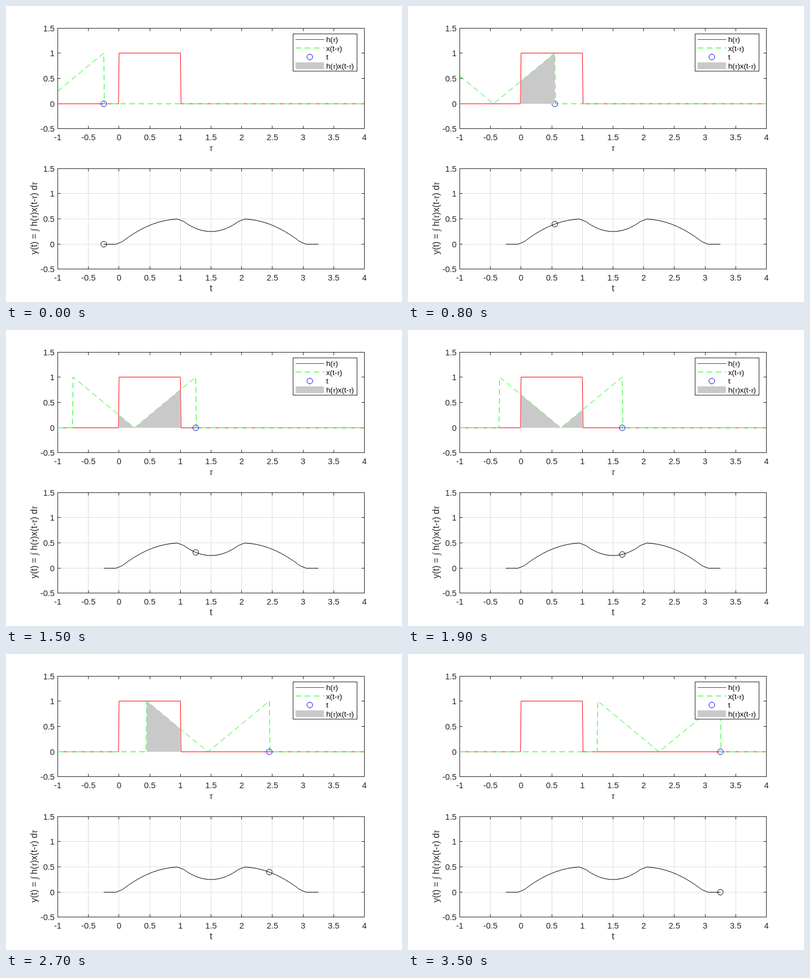
These frames come from a looping animation (700x525 px, 3600 ms). An HTML page with a canvas:

```html
<!DOCTYPE html>
<html lang="en">
<head>
<meta charset="utf-8">
<title>Convolution</title>
<style>
html, body { margin: 0; width: 700px; height: 525px; overflow: hidden; background: #fff; }
canvas { display: block; }
</style>
</head>
<body>
<canvas id="stage" width="700" height="525"></canvas>
<script>
const ctx = document.getElementById('stage').getContext('2d');
const STEP = 100, STEPS = 36, EPS = 0.01;
const LEFT = 91.5, RIGHT = 633.5, INK = '#262626', GRAY = '#c9c9c9';
const SANS = '"Liberation Sans", Arial, sans-serif';
const SERIF = '"Liberation Serif", "Times New Roman", serif';

const X = v => LEFT + (v + 1) * 108.4;
const upperY = v => 173.5 - v * 90;
const lowerY = v => 422.5 - v * 89.5;
const clamp = (v, lo, hi) => Math.min(hi, Math.max(lo, v));

// x(u) = |1 - u| on [0, 2]; h is a unit box on [0, 1]
const signal = u => Math.abs(1 - u);
const integral = u => (u - 1) * Math.abs(u - 1) / 2;
const output = t => integral(clamp(t, 0, 2)) - integral(clamp(t - 1, 0, 2));
const timeAt = i => -0.25 + i * 0.1;

function trace(points) {
  ctx.beginPath();
  points.forEach(([x, y]) => ctx.lineTo(x, y));
}

function line(points, color, dash = []) {
  trace(points);
  ctx.setLineDash(dash);
  ctx.strokeStyle = color;
  ctx.stroke();
  ctx.setLineDash([]);
}

function circle(x, y, color) {
  ctx.beginPath();
  ctx.arc(x, y, 5, 0, Math.PI * 2);
  ctx.strokeStyle = color;
  ctx.stroke();
}

// Greek letters and the integral sign use the serif face
function text(str, x, y, size, align = 'left', color = INK) {
  const runs = str.split(/([τ∫])/).filter(Boolean).map(s => {
    const font = (s === 'τ' ? 'italic ' : '') + size + 'px ' + (/[τ∫]/.test(s) ? SERIF : SANS);
    ctx.font = font;
    return { s, font, width: ctx.measureText(s).width };
  });
  const total = runs.reduce((sum, run) => sum + run.width, 0);
  x -= total * { left: 0, center: 0.5, right: 1 }[align];
  ctx.fillStyle = color;
  for (const run of runs) {
    ctx.font = run.font;
    ctx.fillText(run.s, x, y);
    x += run.width;
  }
}

function axes(rows, label, grid) {
  const top = rows[0], bottom = rows[4];
  const columns = Array.from({ length: 11 }, (_, i) => -1 + i / 2);
  const snap = v => Math.floor(X(v)) + 0.5;
  if (grid) {
    columns.forEach(v => line([[snap(v), top], [snap(v), bottom]], '#dedede'));
    rows.forEach(y => line([[LEFT, y], [RIGHT, y]], '#dedede'));
  }
  ctx.strokeStyle = INK;
  ctx.strokeRect(LEFT, top, RIGHT - LEFT, bottom - top);
  columns.forEach(v => {
    const x = snap(v);
    line([[x, top], [x, top + 5]], INK);
    line([[x, bottom], [x, bottom - 5]], INK);
    text(String(v), X(v), bottom + 20, 14.67, 'center');
  });
  rows.forEach((y, i) => {
    line([[LEFT, y], [LEFT + 5, y]], INK);
    line([[RIGHT, y], [RIGHT - 5, y]], INK);
    text(String(1.5 - i / 2), 86, y + 5, 14.67, 'right');
  });
  text(label, 362.5, bottom + 39.5, 16, 'center');
}

function legend() {
  ctx.fillStyle = '#fff';
  ctx.fillRect(507.5, 49.5, 113, 66);
  ctx.strokeStyle = INK;
  ctx.strokeRect(507.5, 49.5, 113, 66);
  line([[512, 59.5], [562.5, 59.5]], '#f00');
  line([[512, 74.5], [562.5, 74.5]], '#0f0', [10, 6]);
  circle(537, 90.5, '#00f');
  ctx.fillStyle = GRAY;
  ctx.fillRect(512, 100, 50, 12);
  ['h(τ)', 'x(t-τ)', 't', 'h(τ)x(t-τ)'].forEach((s, i) =>
    text(s, 566, 64 + i * 15.7, 13.2, 'left', '#000'));
}

function shifted(t) {
  const points = [[t - 2 - EPS, 0], [t - 2, 1], [t - 1, 0], [t, 1], [t + EPS, 0], [4, 0]]
    .filter(([v]) => v > -1);
  const start = t + 1 <= 2 ? signal(t + 1) : 0;
  return [[-1, start], ...points].map(([v, y]) => [X(v), upperY(y)]);
}

function overlap(t) {
  const a = Math.max(0, t - 2), b = Math.min(1, t);
  if (a >= b) return;
  const points = [a, clamp(t - 1, a, b), b].map(v => [v, signal(t - v)]);
  trace([[a, 0], ...points, [b, 0]].map(([v, y]) => [X(v), upperY(y)]));
  ctx.fillStyle = GRAY;
  ctx.fill();
}

function draw(t) {
  ctx.fillStyle = '#fff';
  ctx.fillRect(0, 0, 700, 525);
  ctx.lineWidth = 1;

  axes([39.5, 83.5, 128.5, 173.5, 217.5], 'τ', false);
  const box = [[-1, 0], [-EPS, 0], [0, 1], [1, 1], [1 + EPS, 0], [4, 0]];
  line(box.map(([v, y]) => [X(v), upperY(y)]), '#f00');
  line(shifted(t), '#0f0', [10, 6]);
  circle(X(t), upperY(0), '#00f');
  overlap(t);
  legend();

  axes([288.5, 332.5, 377.5, 422.5, 466.5], 't', true);
  const curve = Array.from({ length: STEPS }, (_, i) => timeAt(i));
  line(curve.map(v => [X(v), lowerY(output(v))]), '#000');
  circle(X(t), lowerY(output(t)), '#000');

  ctx.save();
  ctx.translate(54.5, 376.5);
  ctx.rotate(-Math.PI / 2);
  text('y(t) = ∫ h(τ)x(t-τ) dτ', 0, 0, 16, 'center');
  ctx.restore();
}

function tick() {
  draw(timeAt(Math.floor(performance.now() / STEP) % STEPS));
  requestAnimationFrame(tick);
}
tick();
</script>
</body>
</html>
```
